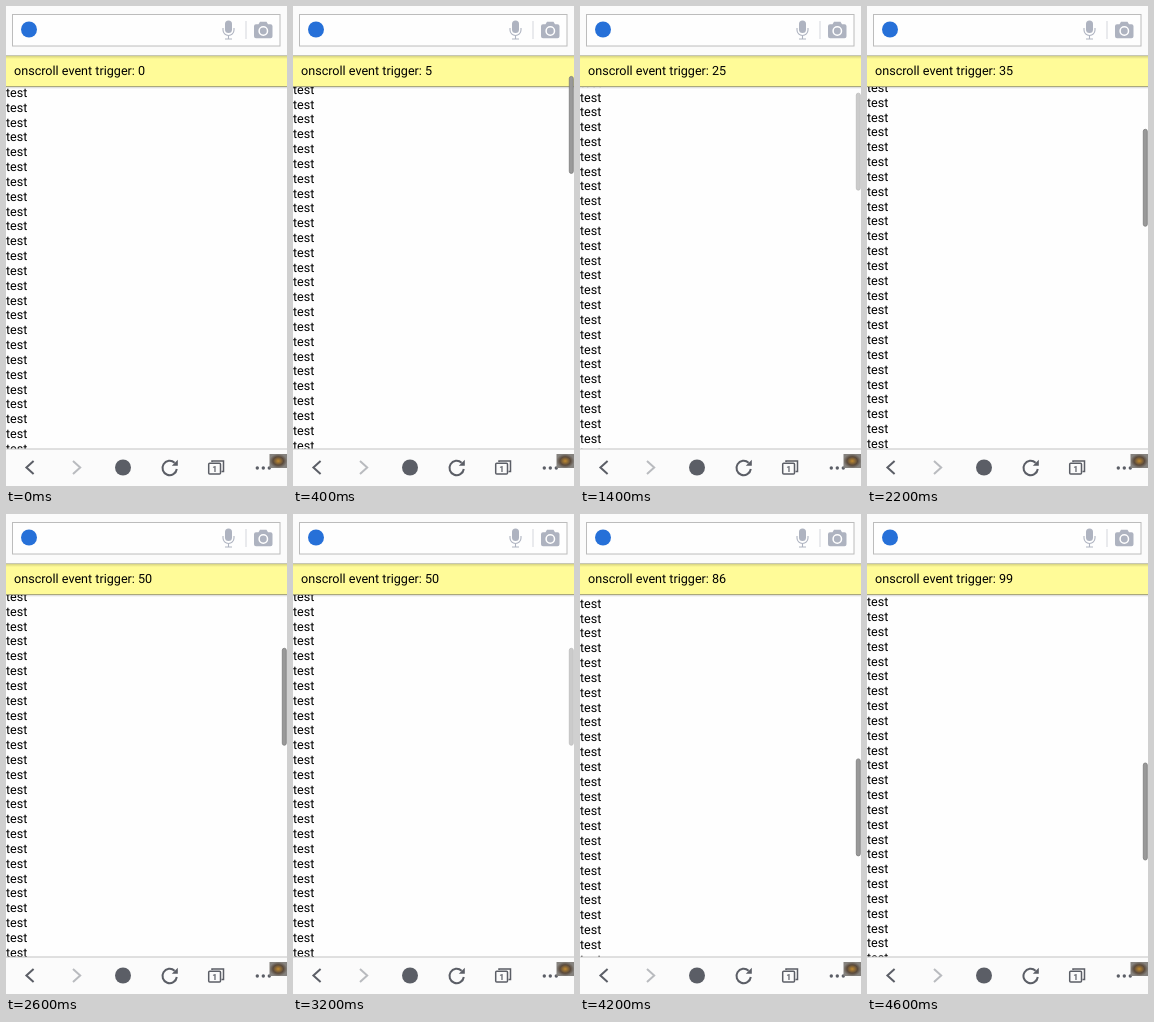
Recreate the animation shown at these times as an HTML page. Size 281 by 480 pixels, loop 4.8 s.

```html
<!DOCTYPE html>
<html lang="en">
<head>
<meta charset="utf-8">
<title>Scroll event counter</title>
<style>
  html, body { margin: 0; width: 100%; height: 100%; overflow: hidden; background: #fefefe; }
  svg { display: block; width: 281px; height: 480px; }
  text { font: 12.6px Roboto, Arial, sans-serif; text-rendering: geometricPrecision; }
  .line { fill: none; stroke-width: 2; stroke: #5b5e66; }
  .thin { stroke-width: 1.5; }
</style>
</head>
<body>
<svg viewBox="0 0 281 480">
  <defs>
    <linearGradient id="shade" x2="0" y2="1">
      <stop stop-color="#000" stop-opacity=".16"/>
      <stop offset="1" stop-color="#000" stop-opacity="0"/>
    </linearGradient>
    <radialGradient id="photo">
      <stop stop-color="#c08a30"/>
      <stop offset=".6" stop-color="#5a4a3c"/>
      <stop offset="1" stop-color="#85827e"/>
    </radialGradient>
  </defs>

  <g id="rows"></g>

  <!-- search bar -->
  <rect width="281" height="50" fill="#fbfbfb"/>
  <rect x="6.5" y="8.5" width="267.5" height="31.5" fill="#fefefe" stroke="#bcbcbc"/>
  <circle cx="23" cy="23.5" r="8" fill="#2670d8"/>
  <g fill="#aeb3c0">
    <rect x="219" y="14.5" width="7" height="12.5" rx="3.5"/>
    <path d="M217 22v2a5.5 5.5 0 0 0 11 0v-2M222.5 29.5v3.5M219 33h7" fill="none" stroke="#aeb3c0" stroke-width="1.1"/>
    <rect x="239.5" y="15" width="1" height="18" fill="#d4d6db"/>
    <path d="M250 18.2h2.5l1.5-2.5h6.5l1.5 2.5h2.5a2 2 0 0 1 2 2v10a2 2 0 0 1-2 2h-14.5a2 2 0 0 1-2-2v-10a2 2 0 0 1 2-2z"/>
    <circle cx="257.3" cy="25" r="4.2" stroke="#fff" stroke-width="1.5"/>
  </g>

  <!-- counter strip -->
  <rect y="50" width="281" height="30" fill="#fffb98"/>
  <rect y="49" width="281" height="1" fill="#c6c6b4"/>
  <rect y="50" width="281" height="3" fill="url(#shade)"/>
  <rect y="80" width="281" height="1" fill="#aaa87c"/>
  <rect y="81" width="281" height="2" fill="url(#shade)"/>
  <text id="label" x="8" y="69"></text>

  <rect id="bar" x="276.3" width="4" height="97" rx="2" fill="#999" stroke="#7c7c7c" stroke-width=".8"/>

  <!-- toolbar -->
  <rect y="443" width="281" height="37" fill="#fbfbfb"/>
  <rect y="442.5" width="281" height="1" fill="#c4c4c4"/>
  <path class="line" d="M27.6 455l-7.2 6.5 7.2 6.5"/>
  <path class="line" d="M67 455l7.2 6.5-7.2 6.5" style="stroke:#b9bbbf"/>
  <circle cx="117" cy="461.5" r="8" fill="#5b5e66"/>
  <path class="line" d="M170.8 463a7.2 7.2 0 1 1-2.2-6.3"/>
  <path d="M171.8 453.8v6h-6z" fill="#5b5e66"/>
  <path class="line thin" d="M206 456v-1h11.5v10.5h-2"/>
  <rect class="line thin" x="202.7" y="457.2" width="11.8" height="10.8" rx="1"/>
  <text x="208.6" y="465.7" text-anchor="middle" fill="#5b5e66" style="font-size:8.5px;font-weight:700">1</text>
  <g fill="#5b5e66">
    <circle cx="251.3" cy="462" r="1.7"/>
    <circle cx="257.3" cy="462" r="1.7"/>
    <circle cx="263.3" cy="462" r="1.7"/>
  </g>
  <rect x="263.5" y="448" width="17.5" height="14" fill="url(#photo)"/>
</svg>

<script>
const LOOP = 4800, STEP = 200, FADE = 400, PITCH = 14.83;
const $ = id => document.getElementById(id);

// Each swipe slows to a stop; the scrollbar fades once the finger lifts.
const swipes = [
  { start: 0, end: 1200, lift: 1200, scroll: [0, 158.6], count: [0, 25], slow: 2.15, pace: 1.45 },
  { start: 1800, end: 2600, lift: 3000, scroll: [158.6, 345.2], count: [25, 50], slow: 2.1, pace: 1.32 },
  { start: 3400, end: 4600, lift: LOOP, scroll: [345.2, 799.5], count: [50, 99], slow: 3.03, pace: 0.73 }
];

for (let i = 0; i < 27; i++) {
  const row = document.createElementNS("http://www.w3.org/2000/svg", "text");
  row.setAttribute("y", 91 + i * PITCH);
  row.textContent = "test";
  $("rows").append(row);
}

const clamp = v => Math.min(1, Math.max(0, v));
const mix = ([a, b], p) => a + (b - a) * p;

function draw(now) {
  const t = Math.floor(now % LOOP / STEP) * STEP;
  const s = swipes.findLast(s => t >= s.start);
  const p = clamp((t - s.start) / (s.end - s.start));
  const scroll = mix(s.scroll, 1 - (1 - p) ** s.slow);
  const count = Math.round(mix(s.count, p ** s.pace));

  $("rows").setAttribute("transform", `translate(0 ${-(scroll % PITCH)})`);
  $("label").textContent = `onscroll event trigger: ${count}`;
  $("bar").setAttribute("y", 47.1 + scroll / 3.96);
  $("bar").setAttribute("opacity", p && clamp(1 - (t - s.lift) / FADE));
  requestAnimationFrame(draw);
}
draw(performance.now());
</script>
</body>
</html>
```
